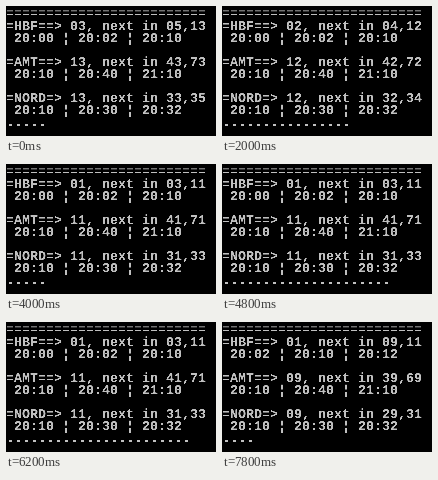
An HTML page for the animation above (8000 ms loop, 210 by 130 pixels).

```html
<!DOCTYPE html>
<html lang="en">
<head>
<meta charset="utf-8">
<title>Departures</title>
<style>
  html, body { margin: 0; width: 100%; height: 100%; overflow: hidden; background: #000; }
  svg { display: block; width: 210px; height: 130px; }
  text {
    font: bold 13.333px "Liberation Mono", monospace;
    fill: #c0c0c0;
    white-space: pre;
    text-rendering: geometricPrecision;
  }
  .rule { font-weight: normal; }
</style>
</head>
<body>
<svg viewBox="0 0 210 130">
  <defs>
    <filter id="crisp" x="0" y="0" width="210" height="130" filterUnits="userSpaceOnUse" color-interpolation-filters="sRGB">
      <feComponentTransfer><feFuncA type="linear" slope="3" intercept="-1"/></feComponentTransfer>
    </filter>
    <pattern id="dot" y="118" width="8" height="2" patternUnits="userSpaceOnUse">
      <rect x="3" width="3" height="2" fill="#c0c0c0"/>
    </pattern>
  </defs>
  <g id="lines" filter="url(#crisp)"></g>
  <rect id="dots" y="118" height="2" fill="url(#dot)"/>
</svg>
<script>
const LOOP = 8000, STEP = 200, COLUMNS = 25, START = 19 * 60 + 57;

const stops = [
  { label: '=HBF==>', times: ['20:00', '20:02', '20:10', '20:12'] },
  { label: '=AMT==>', times: ['20:10', '20:40', '21:10'] },
  { label: '=NORD=>', times: ['20:10', '20:30', '20:32'] }
];

// Each dot row: first step, dots already printed, minutes elapsed
const rows = [
  [0, 5, 0], [6, 4, 1], [12, 2, 1], [19, 5, 2],
  [25, 3, 2], [31, 2, 3], [38, 4, 4]
];

const group = document.getElementById('lines');
const dots = document.getElementById('dots');

function addLine(baseline) {
  const line = document.createElementNS('http://www.w3.org/2000/svg', 'text');
  line.setAttribute('y', baseline);
  group.append(line);
  return line;
}

const rule = addLine(11);
rule.classList.add('rule');
rule.textContent = '='.repeat(COLUMNS);

stops.forEach((stop, i) => {
  stop.head = addLine(24 + i * 36);
  stop.list = addLine(36 + i * 36);
});

function toMinutes(time) {
  const [hours, minutes] = time.split(':').map(Number);
  return hours * 60 + minutes;
}

function showMinute(elapsed) {
  const now = START + elapsed;
  for (const { label, times, head, list } of stops) {
    const next = times.filter(time => toMinutes(time) >= now).slice(0, 3);
    const [a, b, c] = next.map(time => String(toMinutes(time) - now).padStart(2, '0'));
    head.textContent = `${label} ${a}, next in ${b},${c}`;
    list.textContent = ' ' + next.join(' ¦ ');
  }
}

let shownStep = -1, shownMinute = -1;

function draw(time) {
  // The opening picture is held for two steps
  const step = Math.max(0, Math.floor((time % LOOP) / STEP) - 1);
  if (step !== shownStep) {
    shownStep = step;
    const [first, printed, minute] = rows.findLast(row => row[0] <= step);
    dots.setAttribute('width', 8 * Math.min(COLUMNS, printed + 4 * (step - first)));
    if (minute !== shownMinute) showMinute(shownMinute = minute);
  }
}

const origin = performance.now();
function tick() {
  draw(performance.now() - origin);
  requestAnimationFrame(tick);
}
tick();
</script>
</body>
</html>
```
